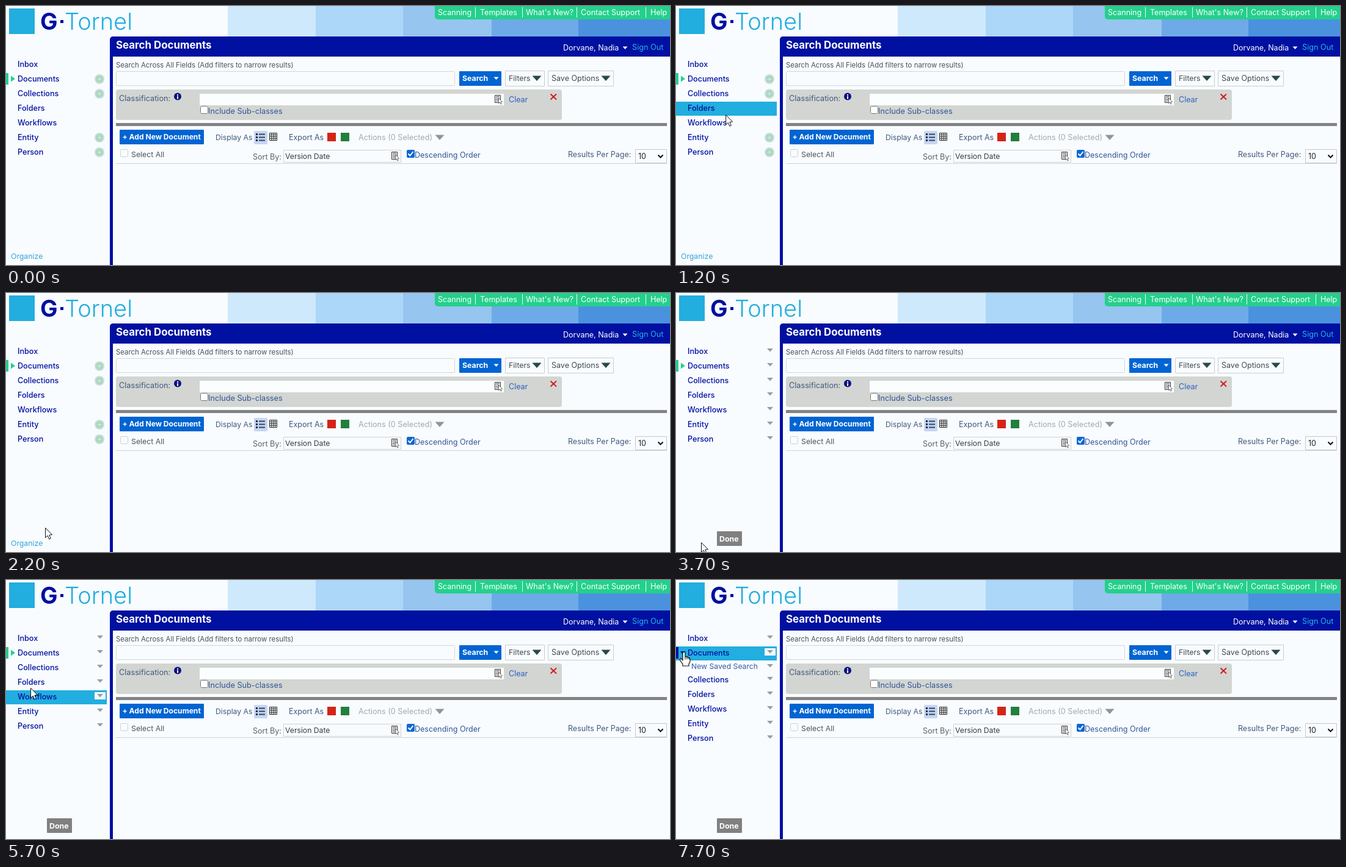
Animation of 1087x425 px, one loop 8 s. Source, as an HTML page with a canvas:

```html
<!DOCTYPE html>
<html lang="en">
<head>
<meta charset="utf-8">
<title>Search Documents</title>
<style>
html, body { margin: 0; width: 1087px; height: 425px; overflow: hidden; background: #f9fcff; }
canvas { display: block; }
</style>
</head>
<body>
<canvas id="stage" width="1087" height="425"></canvas>
<script>
const ctx = document.getElementById('stage').getContext('2d');
const LOOP = 8000, STEP = 100;
const NAVY = '#0010a0', BLUE = '#0064d2', CYAN = '#22aede', GREEN = '#24d08b', PAPER = '#f9fcff';
const ROWS = ['Inbox', 'Documents', 'Collections', 'Folders', 'Workflows', 'Entity', 'Person'];
const WITH_PLUS = ['Documents', 'Collections', 'Entity', 'Person'];

// Pointer path: time, x, y
const PATH = [
  [500, 97, 8], [900, 83.5, 82], [1300, 81, 211], [1400, 80.5, 231], [1500, 80.5, 231],
  [1600, 79, 262], [1900, 65, 384], [2100, 65, 384], [2200, 64.5, 385.5], [2700, 41.5, 409.5],
  [5200, 41.5, 409.5], [5300, 41.5, 392], [5600, 41, 202], [5700, 40.5, 177.5],
  [5900, 30, 128], [6000, 24, 121], [6100, 24, 121], [6200, 18, 119], [6300, 13, 118]
];

function pointerAt(t) {
  if (t < PATH[0][0]) return null;
  const i = PATH.findIndex(k => k[0] > t);
  if (i < 0) return { x: 13, y: 118 };
  const [a, b] = [PATH[i - 1], PATH[i]];
  const p = (t - a[0]) / (b[0] - a[0]);
  return { x: a[1] + (b[1] - a[1]) * p, y: a[2] + (b[2] - a[2]) * p };
}

function rect(x, y, w, h, fill, radius = 0) {
  ctx.fillStyle = fill;
  ctx.beginPath();
  ctx.roundRect(x, y, w, h, radius);
  ctx.fill();
}

function box(x, y, w, h, stroke, fill = PAPER, radius = 0) {
  rect(x, y, w, h, fill, radius);
  ctx.strokeStyle = stroke;
  ctx.lineWidth = 1;
  ctx.beginPath();
  ctx.roundRect(x + .5, y + .5, w - 1, h - 1, radius);
  ctx.stroke();
}

function text(s, x, y, color, size = 12.5, weight = 400) {
  ctx.font = `${weight} ${size}px Inter, sans-serif`;
  ctx.fillStyle = color;
  ctx.fillText(s, x, y);
}

function poly(points, fill, stroke) {
  ctx.beginPath();
  points.forEach(([x, y]) => ctx.lineTo(x, y));
  ctx.closePath();
  ctx.fillStyle = fill;
  ctx.fill();
  if (stroke) {
    ctx.strokeStyle = stroke;
    ctx.lineWidth = 1;
    ctx.stroke();
  }
}

function line(points, stroke, width = 1) {
  ctx.beginPath();
  points.forEach(([x, y]) => ctx.lineTo(x, y));
  ctx.strokeStyle = stroke;
  ctx.lineWidth = width;
  ctx.stroke();
}

function disc(x, y, r, fill) {
  ctx.beginPath();
  ctx.arc(x, y, r, 0, 7);
  ctx.fillStyle = fill;
  ctx.fill();
}

const caret = (x, y, w, h, fill) => poly([[x, y], [x + w, y], [x + w / 2, y + h]], fill);

function arrow(x, y, scale = 1) {
  ctx.save();
  ctx.translate(x, y);
  ctx.scale(scale, scale);
  poly([[0, 0], [0, 16], [3.7, 12.6], [6.2, 18.4], [8.7, 17.3], [6.3, 11.6], [11, 11.2]], '#fff', '#111');
  ctx.restore();
}

function hand(x, y) {
  ctx.save();
  ctx.translate(x, y);
  ctx.beginPath();
  ctx.moveTo(-2, 1.5);
  ctx.quadraticCurveTo(0, -1.5, 2, 1.5);
  for (const [px, py] of [[2, 8], [5, 7.5], [5.5, 9], [8, 9], [8.5, 10.5], [10, 11], [10, 16], [8, 20], [8, 23],
    [-2, 23], [-2, 20], [-6, 14.5], [-6.5, 11.5], [-4.5, 11], [-2, 13.5]]) ctx.lineTo(px, py);
  ctx.closePath();
  ctx.fillStyle = '#fff';
  ctx.fill();
  ctx.strokeStyle = '#111';
  ctx.lineWidth = 1.2;
  ctx.stroke();
  for (const px of [2, 5, 8]) line([[px, 8], [px, 12.5]], '#111');
  ctx.restore();
}

function pickIcon(x, y) {
  box(x, y, 10, 13, '#333', '#fff');
  for (let i = 0; i < 4; i++) rect(x + 2, y + 2 + i * 2.5, 6, 1, '#444');
  arrow(x + 6.5, y + 5, .55);
}

// A green badge, faded until its row is active.
function plusIcon(y, active) {
  ctx.save();
  ctx.globalAlpha = active ? 1 : .3;
  disc(153, y, 8, '#4c9b76');
  disc(153, y, 7, '#e6f5ea');
  disc(153, y, 6, '#4fae7c');
  rect(149, y - 1, 8, 2, '#fff');
  rect(152, y - 4, 2, 8, '#fff');
  ctx.restore();
}

function drawBanner() {
  const bands = [[363, '#cfe9fc'], [507, '#acd7f8'], [650, '#96c5ef'], [795, '#6eaae7'], [937, '#4a92de']];
  for (const [x, color] of bands) rect(x, 0, 1087 - x, 50, color);
  rect(5, 4, 42, 42, CYAN);
  text('G', 56, 39, NAVY, 38, 700);
  rect(89, 23, 5, 5, NAVY);
  text('Tornel', 96, 39, CYAN, 38, 300);

  rect(702, 0, 385, 22, GREEN, [0, 0, 0, 5]);
  [['Scanning', 707], ['Templates', 776], ["What's New?", 851], ['Contact Support', 941], ['Help', 1055]]
    .forEach(([label, x]) => text(label, x, 15, '#fff'));
  for (const x of [768, 845, 934, 1047]) rect(x, 2, 1, 17, '#e9fff6');
}

function drawSearch() {
  rect(170, 50, 917, 375, NAVY, [5, 0, 0, 0]);
  rect(175, 83, 912, 342, PAPER);
  text('Search Documents', 180, 69.5, '#fff', 16.9, 700);
  text('Dorvane, Nadia', 912, 73, '#fff');
  caret(1009.5, 66.5, 8, 4.5, '#fff');
  text('Sign Out', 1025, 72, '#25b4e6', 12.7);

  text('Search Across All Fields (Add filters to narrow results)', 180, 101, '#4b5158', 11.4);
  box(180, 107, 555, 24, '#d3d6d8', PAPER, 1);
  rect(742, 107, 69, 24, BLUE, 1);
  text('Search', 747, 123, '#fff', 12.3, 700);
  caret(798.5, 116.5, 8, 4.5, '#fff');
  box(817, 106, 65, 26, '#c9cdcf');
  text('Filters', 823, 123, '#3f4b52', 12.3);
  caret(861.5, 114.5, 15, 8.5, '#27494c');
  box(887, 106, 108, 26, '#c9cdcf');
  text('Save Options', 893, 123, '#3f4b52');
  caret(974.5, 114.5, 15, 8.5, '#27494c');

  rect(180, 137, 730, 50, '#d3d5d2', 4);
  text('Classification:', 185, 156, '#40597c', 12.7);
  disc(281, 148.5, 6, '#0b1180');
  rect(280, 145, 2, 2, '#fff');
  rect(280, 148, 2, 4.5, '#fff');
  rect(317, 144, 498, 19, '#fbfeff');
  pickIcon(800, 146);
  text('Clear', 823, 158, '#2b62c2');
  line([[891.5, 144.5], [901, 153.5]], '#d01e1e', 2);
  line([[901, 144.5], [891.5, 153.5]], '#d01e1e', 2);
  box(318, 164, 13, 13, '#767676', '#fff', 2);
  text('Include Sub-classes', 331, 177, '#2f5797', 12.7);
  rect(180, 192, 902, 5, '#838383');
}

function drawToolbar() {
  rect(186, 203, 138, 24, BLUE, 1);
  text('+ Add New Document', 190.5, 219, '#fff', 12.1, 700);
  text('Display As', 343, 220, '#40597c', 12.2);
  rect(406, 205, 22, 22, '#c5d6f4', 2);
  for (const y of [209, 214, 219]) {
    rect(409, y, 3, 3, '#202c40');
    rect(414, y + .5, 10, 2, '#34435a');
  }
  box(431, 208, 13, 13, '#222', '#fff');
  for (const d of [3, 6, 9]) {
    rect(431 + d, 208, 1, 13, '#333');
    rect(431, 208 + d, 13, 1, '#333');
  }
  text('Export As', 463, 220, '#40597c');
  rect(526, 208, 14, 14, '#d42417');
  rect(548, 208, 14, 14, '#21803c');
  text('Actions (0 Selected)', 577, 220, '#a1a9ad', 12.6);
  caret(702.5, 211.5, 15, 8.5, '#8b9799');

  box(187, 235, 13, 13, '#cdd0d2', PAPER, 2);
  text('Select All', 205, 248, '#4b555c', 12.3);
  text('Sort By:', 404, 252, '#59626b');
  box(454, 236, 193, 21, '#cdd1d3');
  text('Version Date', 457, 251, '#333b42', 12.2);
  pickIcon(631, 239);
  rect(656, 236, 13, 13, '#0868d4', 2);
  line([[658.5, 242.5], [661.5, 245.5], [666.5, 239]], '#fff', 2);
  text('Descending Order', 669, 249, '#2f5797', 12.5);
  text('Results Per Page:', 920, 248, '#40597c');
  box(1030, 235, 52, 23, '#c4c8ca');
  text('10', 1035, 251, '#222');
  line([[1067.5, 244.5], [1071.5, 248.5], [1075.5, 244.5]], '#111', 2);
  rect(180, 258, 902, 1, '#cfd3d5');
}

function drawMenu(hover, editing, opened) {
  ROWS.forEach((label, i) => {
    const y = 95 + 24 * i + (i > 1 ? opened : 0);
    const active = hover === i;
    const current = label === 'Documents';
    if (active) rect(0, y - 10, 165, 23, CYAN);
    if (current) {
      rect(0, y - 9, 4, 19, active ? NAVY : GREEN);
      if (active && editing) caret(7, y - 2, 9, 6, NAVY);
      else poly([[8, y - 4.5], [8, y + 5.5], [15, y + .5]], active ? NAVY : GREEN);
    }
    text(label, 19, y + 5, NAVY, 12.6, 500);
    if (editing) {
      if (active) rect(145, y - 7, 18, 12, '#f4f8fa');
      caret(149, y - 4, 10, 5.5, '#9a9d9f');
    } else if (WITH_PLUS.includes(label)) {
      plusIcon(y + 1, active);
    }
  });
  if (opened) {
    ctx.save();
    ctx.beginPath();
    ctx.rect(0, 132, 169, opened);
    ctx.clip();
    text('New Saved Search', 25, 146, '#3a5aa5', 12.2);
    caret(149, 138, 10, 5.5, '#9a9d9f');
    ctx.restore();
  }
}

function drawFooter(editing, hovered) {
  if (editing) {
    rect(67, 391, 41, 24, '#808080', 1);
    text('Done', 71, 408, '#fff', 12.4, 700);
    return;
  }
  text('Organize', 8, 415, '#35a5d8', 12.3);
  if (hovered) rect(8, 417, 53, 1, '#35a5d8');
}

function draw(time) {
  const t = Math.floor(time / STEP) * STEP;
  const pointer = pointerAt(t);
  const editing = t >= 3600;
  const opened = t < 7500 ? 0 : Math.min(20, 7 * (1 + (t - 7500) / STEP));
  const onLink = t >= 2500 && t < 3700;

  // The highlighted row trails the moving pointer slightly.
  const trail = t < 5000 ? -10 : 10;
  const hover = pointer ? Math.floor((pointer.y + trail - 85) / 24) : -1;

  rect(0, 0, 1087, 425, PAPER);
  drawBanner();
  drawSearch();
  drawToolbar();
  drawMenu(hover, editing, opened);
  drawFooter(editing, onLink);
  if (pointer) (onLink || t >= 6200 ? hand : arrow)(pointer.x, pointer.y);
}

function tick() {
  draw(performance.now() % LOOP);
  requestAnimationFrame(tick);
}
tick();
</script>
</body>
</html>
```
